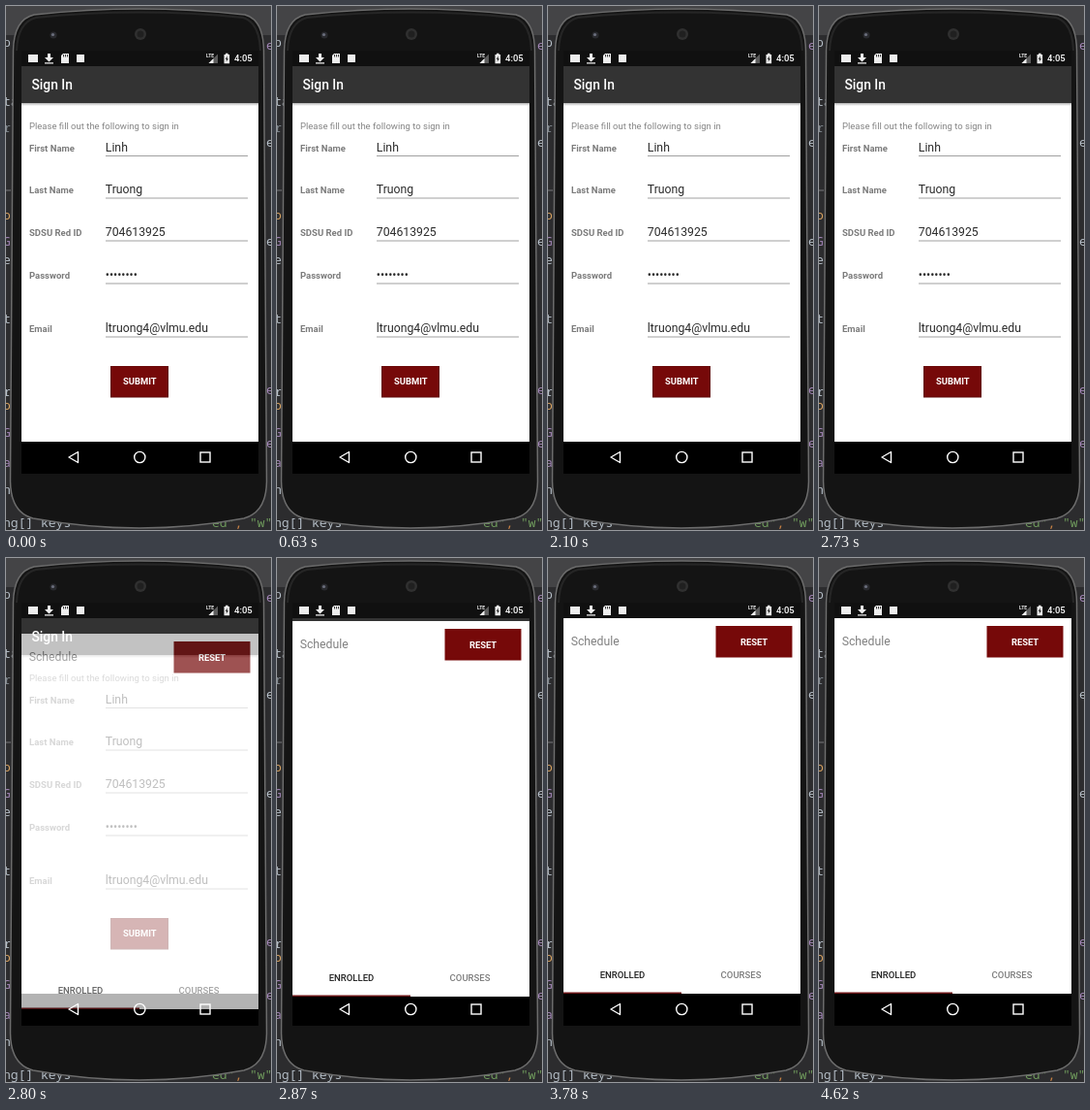
Recreate the animation shown at these times as an HTML page. Size 274 by 540 pixels, loop 4690 ms.

```html
<!DOCTYPE html>
<html lang="en">
<head>
<meta charset="utf-8">
<title>Sign in</title>
<style>
html, body { margin: 0; width: 100%; height: 100%; overflow: hidden; background: #2c2c2e; }
svg { display: block; width: 274px; height: 540px; font: 9.53px Roboto, sans-serif; }
.label { font-weight: 700; fill: #7b7b7b; }
.value { font-size: 12.25px; fill: #2b2b2b; }
.button { font-size: 9.4px; font-weight: 700; fill: #fff; text-anchor: middle; }
.tab { font-weight: 500; text-anchor: middle; }
.code { font: 13px "Noto Sans Mono", monospace; fill: #b4bdc6; }
</style>
</head>
<body>
<svg viewBox="0 0 274 540">
  <defs>
    <clipPath id="screen"><rect x="16" y="46" width="245" height="436"/></clipPath>
    <linearGradient id="shade" x2="0" y2="1">
      <stop stop-color="#000" stop-opacity=".3"/><stop offset="1" stop-color="#000" stop-opacity="0"/>
    </linearGradient>
  </defs>

  <!-- editor behind the phone -->
  <rect width="274" height="540" fill="#2c2c2e"/>
  <rect width="274" height="30" fill="#444446"/>
  <g id="code" class="code">
    <text x="-3" y="503">ng</text>
    <text x="-3" y="537">ng[] keys</text>
    <text x="213" y="537" fill="#6f9a5c">ed"<tspan fill="#c98245">,</tspan> "w"</text>
  </g>
  <path d="M0 190H5" stroke="#77777a"/>

  <!-- phone -->
  <path d="M7.5 46Q8 14 29 9Q84 3 138 3T247 9Q266 14 266.5 46L269.5 490Q269 522 246 528Q192 538 138 538T28 528Q5 522 4.5 490Z"
    fill="#141414" stroke="#6c6c6c" stroke-width="1.5"/>
  <path d="M11 46Q12 17 31 12Q84 6.5 138 6.5T245 12Q262 17 263 46" fill="none" stroke="#262626" stroke-width="2"/>
  <circle cx="139" cy="29" r="6" fill="#303030"/>
  <circle cx="139" cy="29" r="3.5" fill="#202020"/>
  <circle cx="49" cy="30" r="3.5" fill="#292a2e"/>
  <circle cx="48.5" cy="29.5" r="1.6" fill="#6a6e7c"/>

  <g clip-path="url(#screen)">
    <!-- sign-in form -->
    <rect x="16" y="62" width="245" height="387" fill="#fff"/>
    <rect x="16" y="100" width="245" height="3" fill="url(#shade)"/>
    <rect x="16" y="62" width="245" height="38" fill="#333"/>
    <text x="26.5" y="85.8" font-size="13.8" font-weight="500" fill="#fff">Sign In</text>
    <text x="24" y="126.5" fill="#858585">Please fill out the following to sign in</text>
    <g id="form"></g>
    <rect x="108" y="371" width="60" height="32.5" fill="#5e0808"/>
    <rect x="109" y="371.5" width="58" height="31" fill="#760909"/>
    <text class="button" x="138.3" y="390.2">SUBMIT</text>
    <rect x="16" y="449" width="245" height="33" fill="#000"/>

    <!-- schedule window -->
    <g id="schedule">
      <rect x="16" y="62" width="245" height="387" fill="#fff"/>
      <text x="23.7" y="90.3" font-size="12.25" fill="#808080">Schedule</text>
      <rect x="173.5" y="70" width="79" height="32.5" fill="#760909"/>
      <text class="button" x="213" y="89.7">RESET</text>
      <text class="tab" x="77" y="433.3" fill="#222">ENROLLED</text>
      <text class="tab" x="199.5" y="433.3" fill="#7c7c7c">COURSES</text>
      <rect x="16" y="447.5" width="122" height="1.5" fill="#6b1517"/>
    </g>

    <!-- navigation and status bars -->
    <g fill="none" stroke="#fff" stroke-width="1.4">
      <path d="M74.5 459.5V470.5L65 465Z" stroke-linejoin="round"/>
      <circle cx="138.3" cy="465" r="5.6"/>
      <rect x="201" y="460" width="10" height="10"/>
    </g>
    <rect x="16" y="46" width="245" height="16" fill="#101010"/>
    <g fill="#eee">
      <rect x="23" y="50" width="10" height="8"/>
      <path d="M43 49h3v4h3l-4.5 4.5L40 53h3ZM40 58.2h9v1.3h-9Z"/>
      <path d="M59 49h6v10h-8v-8Z"/>
      <path d="M59.5 50v2.5M61.5 50v2.5M63.5 50v2.5" stroke="#101010" stroke-width=".8"/>
      <rect x="73" y="50" width="8" height="8"/>
      <text x="207" y="53" font-size="5" font-weight="700">LTE</text>
      <path d="M219 49.5V59H209.5Z" opacity=".35"/>
      <path d="M214.5 54V59H209.5Z"/>
      <path d="M225.5 50h1.5v-1.2h2.6V50h1.5v9.3h-5.6Z"/>
      <path d="M229 51.5l-2.3 3.3h1.4l-.5 2.7 2.3-3.3h-1.4Z" fill="#101010"/>
      <text x="236" y="57" font-weight="500" fill="#fff">4:05</text>
    </g>
  </g>
</svg>
<script>
const $ = id => document.getElementById(id);
const FIELDS = [
  [154.5, "First Name", "Linh"],
  [198, "Last Name", "Truong"],
  [242, "SDSU Red ID", "704613925"],
  [286, "Password", "••••••••"],
  [341, "Email", "ltruong4@vlmu.edu"]
];
$("form").innerHTML = FIELDS.map(([y, label, value]) => `
  <text class="label" x="24" y="${y - 5}">${label}</text>
  <text class="value" x="102.8" y="${y - 5}">${value}</text>
  <path d="M103 ${y}H250" stroke="#8a8a8a" stroke-width=".8"/>`).join("");

// Slivers of code visible beside the phone
const LEFT = [
  [42, "p", "#b4bdc6"], [103, "ta", "#b4bdc6"], [130, "r", "#7e858c"],
  [220, "o", "#d6a05f"], [247, "G", "#a184b5"], [266, "e", "#b4bdc6"],
  [327, "t:", "#b4bdc6"], [402, "r", "#b4bdc6"], [416, "o", "#d6a05f"],
  [444, "G", "#a184b5"], [475, "as", "#a184b5"]
];
const RIGHT = [
  [45, "e", "#a184b5"], [145, "e", "#b4bdc6"], [247, "e", "#b4bdc6"],
  [400, "e", "#a184b5"], [455, "e", "#a184b5"]
];
const slivers = (x, list) => list.map(([y, s, c]) =>
  `<text x="${x}" y="${y}" style="fill:${c}">${s}</text>`).join("");
$("code").innerHTML += slivers(-3, LEFT) + slivers(269, RIGHT);

const LOOP = 4690, STEP = 70, OPEN = 2800;

// The schedule window fades in while it slides up and settles
function draw(now) {
  const n = Math.floor((now % LOOP - OPEN) / STEP);
  const dy = n < 0 ? 16 : Math.round(16 * 0.19 ** n);
  $("schedule").setAttribute("transform", `translate(0 ${dy})`);
  $("schedule").setAttribute("opacity", n < 0 ? 0 : n < 1 ? 0.7 : 1);
  requestAnimationFrame(draw);
}
draw(performance.now());
</script>
</body>
</html>
```
